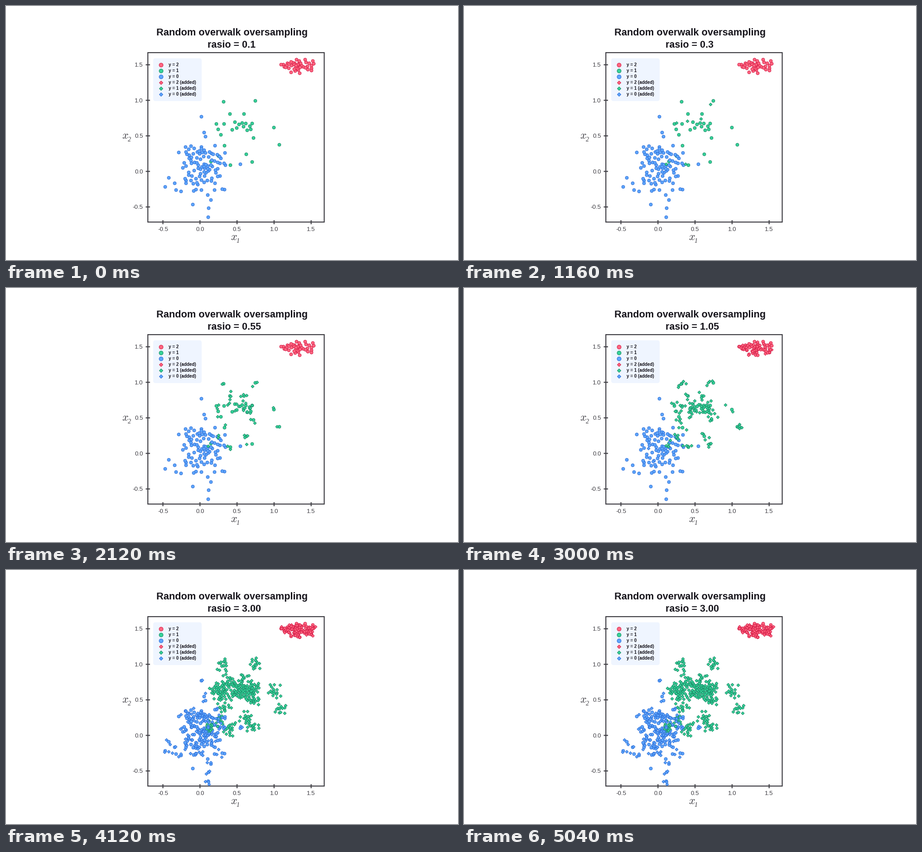
Recreate the animation shown at these times as a matplotlib script. Size 998x561 px, loop 5080 ms.

```python
import numpy as np
import matplotlib.pyplot as plt
from matplotlib.animation import FuncAnimation
from matplotlib.patches import FancyBboxPatch, Rectangle

W, H, DPI = 998, 561, 64
PT = 72 / DPI  # points per pixel
STEP, FRAMES = 40, 127
INK, AXIS = "#17151c", "#3d3c42"
RED = ("#ff6680", "#d41c48")
GREEN = ("#36d399", "#188a66")
BLUE = ("#5ea6fb", "#2b6cd8")

rng = np.random.default_rng(7)


def spaced(draw, count, gap, low=(0, 0), high=(W, H)):
    """Collect random points inside a box that keep a small distance."""
    found = []
    for _ in range(60 * count):
        p = draw()
        inside = np.all(p >= low) and np.all(p <= high)
        if inside and all(np.hypot(*(p - q)) > gap for q in found):
            found.append(p)
        if len(found) == count:
            break
    return np.array(found)


def cloud(center, spread, count, gap, low, high):
    return spaced(lambda: rng.normal(center, spread), count, gap, low, high)


def wander(base, count, spread, gap=3, **box):
    """Random offspring scattered close to randomly chosen parents."""
    def draw():
        step = np.clip(rng.normal(0, spread, 2), -2 * spread, 2 * spread)
        return base[rng.integers(len(base))] + step
    return spaced(draw, count, gap, **box)


# Dense clouds, with the clearly separate points set by hand
green_loners = [
    (480, 211), (550, 209), (494, 238), (525, 238), (464, 260), (481, 260),
    (468, 272), (474, 284), (591, 268), (603, 306), (482, 308), (469, 331),
    (530, 327), (543, 344), (495, 351), (452, 343), (546, 291)]
blue_loners = [
    (431, 244), (437, 279), (440, 288), (381, 323), (517, 349), (359, 379),
    (372, 391), (351, 399), (375, 406), (386, 409), (452, 428), (412, 438),
    (447, 446), (446, 466)]
red_box = {"low": (606, 118), "high": (686, 148)}

red = cloud((644, 132), (24, 7), 42, 3.2, **red_box)
green = np.vstack([green_loners, cloud((524, 265), (14, 11), 11, 6,
                                       (498, 252), (546, 287))])
blue = np.vstack([blue_loners, cloud((431, 357), (27, 32), 92, 4,
                                     (389, 304), (485, 420))])

# Ratio label, then the added points of each class
none = np.empty((0, 2))
first_walk = wander(green, 40, 6, 4)
STAGES = [
    ("0.1", none, none, none),
    ("0.3", none, first_walk[:6], none),
    ("0.55", none, first_walk, none),
    ("1.05", wander(red, 32, 2.5, **red_box), wander(green, 96, 7),
     wander(blue, 3, 5)),
    ("3.00", wander(red, 75, 2.5, 2.5, **red_box), wander(green, 300, 7.5),
     wander(blue, 125, 4)),
]

fig = plt.figure(figsize=(W / DPI, H / DPI), dpi=DPI, facecolor="white")
ax = fig.add_axes([0, 0, 1, 1])
ax.set(xlim=(0, W), ylim=(H, 0))
ax.axis("off")


def label(x, y, text, size, font="Liberation Sans", color=INK, **style):
    return ax.text(x, y, text, fontsize=size * PT, family=font, color=color,
                   va="baseline", **style)


def markers(xy, colors, shape, size, z):
    fill, edge = colors
    return ax.plot(xy[:, 0], xy[:, 1], ls="none", marker=shape,
                   markersize=size * PT, mfc=fill, mec=edge,
                   mew=PT, zorder=z, snap=False)[0]


def segment(xs, ys):
    ax.plot(xs, ys, color=AXIS, lw=2.2 * PT, solid_capstyle="butt", zorder=2,
            snap=False)


ax.add_patch(Rectangle((313.2, 103), 389.4, 374.2, fill=False, ec=AXIS,
                       lw=2.2 * PT, joinstyle="miter", zorder=2, snap=False))
for value in (-0.5, 0, 0.5, 1, 1.5):
    x, y = 428.3 + 163.6 * value, 365.3 - 157 * value
    segment([x, x], [473, 482])
    segment([308.5, 318], [y, y])
    label(x, 496.5, f"{value:.1f}", 13.2, color=AXIS, ha="center")
    label(302.5, y + 4.4, f"{value:.1f}", 13.2, color=AXIS, ha="right")

plt.rcParams["mathtext.fontset"] = "cm"
for x, y, index in ((496, 517, "1"), (256, 293, "2")):
    label(x, y, "$x$", 24, color=AXIS)
    label(x + 12.5, y + 6, index, 14, "Liberation Serif", AXIS, style="italic")

label(499.5, 65, "Random overwalk oversampling", 21.8, weight="bold", ha="center")
ratio = label(445, 92, "", 21.5, weight="bold")

ax.add_patch(FancyBboxPatch((329, 119.5), 99, 86.5, fc="#eff5ff", ec="none",
                            boxstyle="round,pad=4,rounding_size=5", zorder=1))
rows = [(shape, size, colors, name + suffix)
        for shape, size, suffix in (("o", 8.8, ""), ("D", 6, " (added)"))
        for name, colors in (("y = 2", RED), ("y = 1", GREEN), ("y = 0", BLUE))]
for i, (shape, size, colors, text) in enumerate(rows):
    y = 130.2 + 13 * i
    markers(np.array([[341.6, y]]), colors, shape, size, 3)
    label(359, y + 3.2, text, 9.9, weight="bold")

for z, (xy, colors) in enumerate(((red, RED), (green, GREEN), (blue, BLUE)), 4):
    markers(xy, colors, "o", 6.8, z)
added = [markers(none, colors, "D", 4.8, z)
         for z, colors in enumerate((RED, GREEN, BLUE), 7)]


def update(frame):
    stage = min(frame * STEP // 1000, len(STAGES) - 1)
    text, *groups = STAGES[stage]
    ratio.set_text("rasio = " + text)
    for artist, xy in zip(added, groups):
        artist.set_data(xy[:, 0], xy[:, 1])
    return [ratio, *added]


anim = FuncAnimation(fig, update, frames=FRAMES, interval=STEP,
                     repeat=True, repeat_delay=0, blit=False)
plt.show()
```
